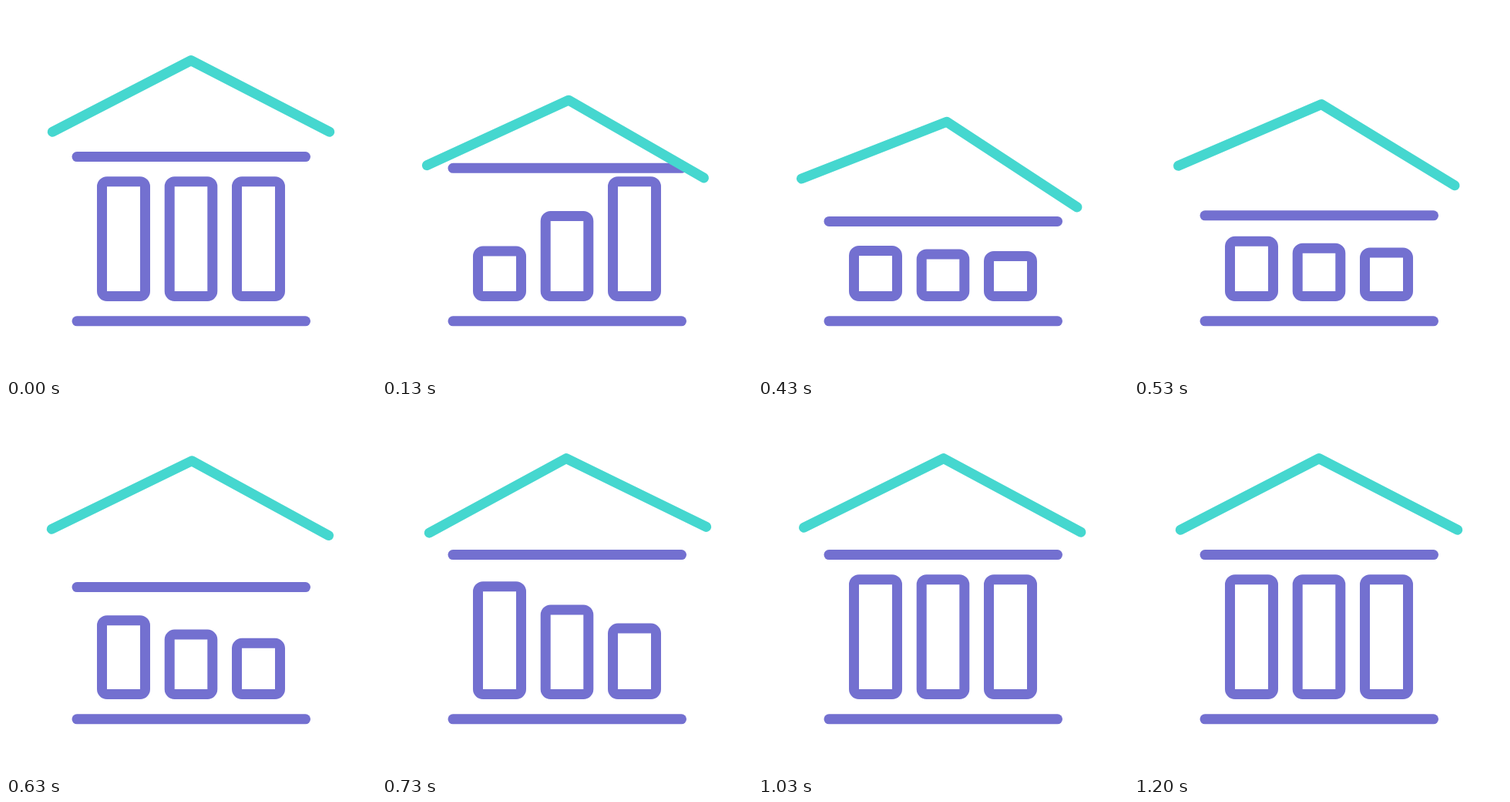
Write an HTML page that moves like this. It is 480 px wide and 480 px high and loops after 1530 ms.

```html
<!DOCTYPE html>
<html lang="en">
<head>
<meta charset="utf-8">
<title>Bank icon</title>
<style>
  html, body { margin: 0; width: 100%; height: 100%; overflow: hidden; background: #fff; }
  svg { display: block; width: 100%; height: 100%; }
</style>
</head>
<body>
<svg viewBox="0 0 480 480" fill="none" stroke="#7370d0" stroke-width="13" stroke-linecap="round" stroke-linejoin="round">
  <path d="M92 408.8H388.5"/>
  <path id="beam" d="M92 195.6H388.5"/>
  <rect class="bar" x="124.5" width="56" rx="6.5"/>
  <rect class="bar" x="212.2" width="55.6" rx="6.5"/>
  <rect class="bar" x="299.5" width="56" rx="6.5"/>
  <path id="roof" stroke="#45d7cf" d="M60.3 163.3L240 70.6L419.7 163.3"/>
</svg>
<script>
const LOOP = 1530, FPS = 30, LAST = 36;
const BAR_TOP = 227.7, BAR_BOTTOM = 376.5, BAR_DROP = 98, DROP = 84;

const roof = document.getElementById('roof');
const beam = document.getElementById('beam');
const bars = document.querySelectorAll('.bar');

// Easing curve with control points (a, 0) and (b, 1).
function bezier(a, b) {
  return x => {
    let lo = 0, hi = 1;
    for (let i = 0; i < 24; i++) {
      const s = (lo + hi) / 2, r = 1 - s;
      if (3 * r * r * s * a + 3 * r * s * s * b + s * s * s < x) lo = s;
      else hi = s;
    }
    return lo * lo * (3 - 2 * lo);
  };
}

const fall = bezier(0.4, 0.2);
const lift = bezier(0.84, 0.66);
const grow = bezier(0.9, 0.74);
const tilt = bezier(0.27, 0.5);
const soft = bezier(1 / 3, 2 / 3);

function ramp(n, from, to, ease) {
  if (n <= from) return 0;
  return n >= to ? 1 : ease((n - from) / (to - from));
}

// Goes down to 1, then back to 0.
const dip = (n, a, b, c, d, back) => ramp(n, a, b, fall) - ramp(n, c, d, back);

function roofAngle(n) {
  return 6.2 * ramp(n, 0, 11, tilt)
    - 8.8 * ramp(n, 11.5, 25.5, soft)
    + 3.8 * ramp(n, 25.5, 32, soft)
    - 1.2 * ramp(n, 32, LAST, soft);
}

function draw(ms) {
  const n = Math.min(LAST, Math.floor((ms + 3.4) * FPS / 1000));
  const roofY = DROP * dip(n, 0, 10, 10, 20, lift);
  const beamY = DROP * dip(n, 1.6, 12.4, 12.4, 22, lift);
  roof.setAttribute('transform', `translate(0 ${roofY}) rotate(${roofAngle(n)} 240 117)`);
  beam.setAttribute('transform', `translate(0 ${beamY})`);
  bars.forEach((bar, i) => {
    const y = BAR_TOP + BAR_DROP * dip(n - 2 * i, 0, 6, 6, 24, grow);
    bar.setAttribute('y', y);
    bar.setAttribute('height', BAR_BOTTOM - y);
  });
}

let start = null;
function tick(now) {
  if (start === null) start = now;
  draw((now - start) % LOOP);
  requestAnimationFrame(tick);
}
draw(0);
requestAnimationFrame(tick);
</script>
</body>
</html>
```
